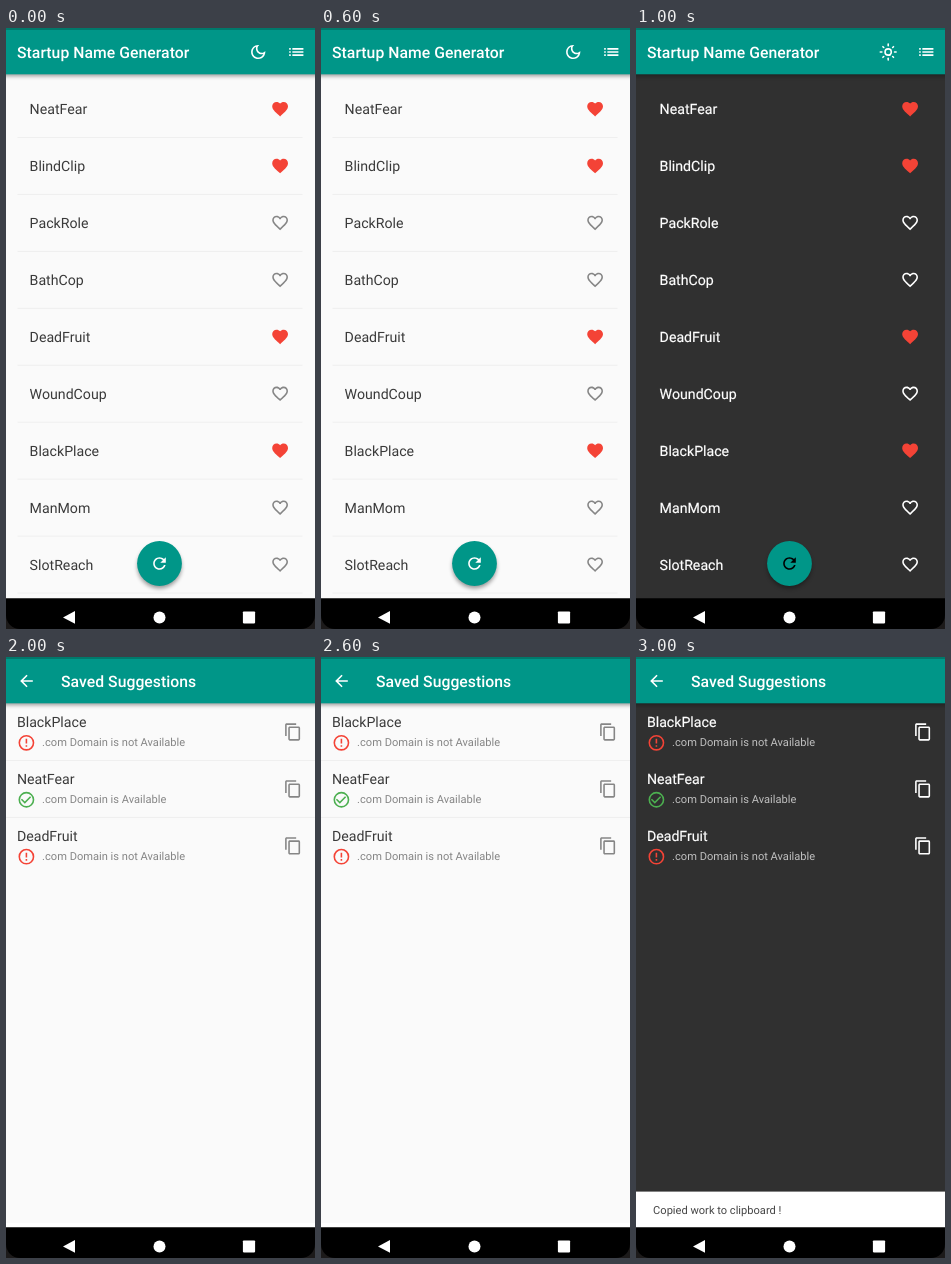
Animation, 309 px wide and 601 px high, one loop 4000 ms. Source, as an HTML page:

```html
<!DOCTYPE html>
<html lang="en">
<head>
<meta charset="utf-8">
<title>Name generator app</title>
<style>
html, body { margin: 0; width: 100%; height: 100%; overflow: hidden; background: #000; }
svg { display: block; width: 309px; height: 601px; font-family: Roboto, sans-serif; text-rendering: geometricPrecision; }
.title { font-size: 15.74px; font-weight: 500; letter-spacing: .04px; fill: #fff; }
.name { font-size: 14.17px; }
.note { font-size: 11.1px; }
.dark .name { stroke: #fff; stroke-width: .2px; }
</style>
</head>
<body>
<svg id="stage" viewBox="0 0 309 601" xmlns="http://www.w3.org/2000/svg">
  <defs>
    <filter id="soft" x="-30%" y="-50%" width="160%" height="200%"><feGaussianBlur stdDeviation="2"/></filter>
  </defs>
  <g id="view"></g>
  <rect y="580" width="309" height="21" fill="#1c1a1a"/>
  <path d="M0 570.2H309V587a14 14 0 0 1-14 14H14a14 14 0 0 1-14-14z"/>
  <g fill="#fff">
    <path d="M57 589.4L69 583v12.8z"/>
    <circle cx="153.5" cy="589.4" r="6"/>
    <rect x="236.9" y="583.5" width="12.2" height="11.9" rx=".8"/>
  </g>
</svg>
<script>
const HOLD = 1000, PITCH = 56.94, SCALE = 0.79;
const TEAL = '#009688', RED = '#f44336', GREEN = '#4caf50';

const light = { mode: 'light', bg: '#fafafa', text: '#3a3a3a', note: '#858585', icon: '#868686', fab: '#fff', line: '#efefef', shadow: .4 };
const dark = { mode: 'dark', bg: '#303030', text: '#fff', note: '#c0c0c0', icon: '#fff', fab: '#000', line: 'none', shadow: .35 };

const names = ['NeatFear', 'BlindClip', 'PackRole', 'BathCop', 'DeadFruit', 'WoundCoup', 'BlackPlace', 'ManMom', 'SlotReach'];
const liked = new Set(['NeatFear', 'BlindClip', 'DeadFruit', 'BlackPlace']);
const saved = [['BlackPlace', false], ['NeatFear', true], ['DeadFruit', false]];

const path = d => `<path d="${d}"/>`;
const ring = '<circle cx="12" cy="12" r="9" fill="none" stroke="currentColor" stroke-width="2"/>';
const rays = [0, 45, 90, 135, 180, 225, 270, 315]
  .map(a => `<path d="M12 ${a % 90 ? 2.5 : 2}V4" transform="rotate(${a} 12 12)"/>`).join('');

// Shapes on a 24 x 24 grid
const icons = {
  heart: path('M12 21.35l-1.45-1.32C5.4 15.36 2 12.28 2 8.5 2 5.42 4.42 3 7.5 3c1.74 0 3.41.81 4.5 2.09C13.09 3.81 14.76 3 16.5 3 19.58 3 22 5.42 22 8.5c0 3.78-3.4 6.86-8.55 11.54z'),
  heartLine: path('M16.5 3c-1.74 0-3.41.81-4.5 2.09C10.91 3.81 9.24 3 7.5 3 4.42 3 2 5.42 2 8.5c0 3.78 3.4 6.86 8.55 11.54L12 21.35l1.45-1.32C18.6 15.36 22 12.28 22 8.5 22 5.42 19.58 3 16.5 3zm-4.4 15.55l-.1.1-.1-.1C7.14 14.24 4 11.39 4 8.5 4 6.5 5.5 5 7.5 5c1.54 0 3.04.99 3.57 2.36h1.87C13.46 5.99 14.96 5 16.5 5c2 0 3.5 1.5 3.5 3.5 0 2.89-3.14 5.74-7.9 10.05z'),
  moon: path('M9.37 5.51C9.19 6.15 9.1 6.82 9.1 7.5c0 4.08 3.32 7.4 7.4 7.4.68 0 1.35-.09 1.99-.27C17.45 17.19 14.93 19 12 19c-3.86 0-7-3.14-7-7 0-2.93 1.81-5.45 4.37-6.49zM12 3c-4.97 0-9 4.03-9 9s4.03 9 9 9 9-4.03 9-9c0-.46-.04-.92-.1-1.36-.98 1.37-2.58 2.26-4.4 2.26-2.98 0-5.4-2.42-5.4-5.4 0-1.81.89-3.42 2.26-4.4C12.92 3.04 12.46 3 12 3z'),
  sun: `<g fill="none" stroke="currentColor" stroke-width="2" stroke-linecap="round"><circle cx="12" cy="12" r="4"/>${rays}</g>`,
  list: path('M3 7h2v2H3zM3 11h2v2H3zM3 15h2v2H3zM7 7h14v2H7zM7 11h14v2H7zM7 15h14v2H7z'),
  refresh: path('M17.65 6.35C16.2 4.9 14.21 4 12 4c-4.42 0-7.99 3.58-7.99 8s3.57 8 7.99 8c3.73 0 6.84-2.55 7.73-6h-2.08c-.82 2.33-3.04 4-5.65 4-3.31 0-6-2.69-6-6s2.69-6 6-6c1.66 0 3.14.69 4.22 1.78L13 11h7V4z'),
  back: path('M20 11H7.83l5.59-5.59L12 4l-8 8 8 8 1.41-1.41L7.83 13H20z'),
  copy: path('M16 1H4c-1.1 0-2 .9-2 2v14h2V3h12zm3 4H8c-1.1 0-2 .9-2 2v14c0 1.1.9 2 2 2h11c1.1 0 2-.9 2-2V7c0-1.1-.9-2-2-2zm0 16H8V7h11z'),
  error: ring + path('M11 15h2v2h-2zM11 7h2v6h-2z'),
  check: ring + path('M16.59 7.58L10 14.17l-3.59-3.58L5 12l5 5 8-8z')
};

const icon = (name, x, y, color) =>
  `<g transform="translate(${x} ${y}) scale(${SCALE}) translate(-12 -12)" fill="${color}" color="${color}">${icons[name]}</g>`;
const text = (s, x, y, cls, color) =>
  `<text x="${x}" y="${y}" class="${cls}"${color ? ` fill="${color}"` : ''}>${s}</text>`;
const rect = (x, y, w, h, color, extra = '') =>
  `<rect x="${x}" y="${y}" width="${w}" height="${h}" fill="${color}" ${extra}/>`;

const appBar = (theme, content) =>
  rect(-8, 6, 325, 42, '#000', `opacity="${theme.shadow}" filter="url(#soft)"`) +
  rect(0, 0, 309, 46.3, TEAL) + rect(0, 0, 309, 2, '#00796b') + content;

const page = (theme, body, bar) =>
  `<g class="${theme.mode}">${rect(0, 0, 309, 571, theme.bg)}${body}${appBar(theme, bar)}</g>`;

function homePage(theme, modeIcon) {
  const rows = names.map((name, i) => {
    const y = 81 + i * PITCH, on = liked.has(name);
    return text(name, 23.6, y + 5.2, 'name', theme.text) +
      icon(on ? 'heart' : 'heartLine', 274.1, y, on ? RED : theme.icon) +
      rect(11.5, y + 28, 285, 1, theme.line);
  }).join('');
  const fab = `<circle cx="153.5" cy="538.5" r="22" opacity="${theme.shadow}" filter="url(#soft)"/>` +
    `<circle cx="153.5" cy="535.5" r="22.4" fill="${TEAL}"/>` + icon('refresh', 153.5, 535.5, theme.fab);
  const bar = text('Startup Name Generator', 11, 30, 'title') +
    icon(modeIcon, 252.2, 24, '#fff') + icon('list', 290.3, 24, '#fff');
  return page(theme, rows + fab, bar);
}

function savedPage(theme, message) {
  const rows = saved.map(([name, free], i) => {
    const y = 75 + i * PITCH;
    return text(name, 10.9, y - 5, 'name', theme.text) +
      icon(free ? 'check' : 'error', 20.4, y + 10.8, free ? GREEN : RED) +
      text(`.com Domain is ${free ? '' : 'not '}Available`, 36.1, y + 14.4, 'note', theme.note) +
      icon('copy', 287, y, theme.icon) +
      (i < saved.length - 1 ? rect(0, y + 28, 309, 1, theme.line) : '');
  }).join('');
  const snack = message
    ? rect(0, 534.6, 309, 36.4, '#fff') + text(message, 17.1, 556.8, 'note', '#444')
    : rect(0, 566, 309, 5, '#fff');
  const bar = icon('back', 20.5, 24, '#fff') + text('Saved Suggestions', 55, 30, 'title');
  return page(theme, rows + snack, bar);
}

const scenes = [
  homePage(light, 'moon'),
  homePage(dark, 'sun'),
  savedPage(light),
  savedPage(dark, 'Copied work to clipboard !')
];

const view = document.getElementById('view');
const start = performance.now();
let shown = -1;

function draw(now) {
  const index = Math.floor(Math.max(0, now - start) / HOLD) % scenes.length;
  if (index !== shown) {
    view.innerHTML = scenes[index];
    shown = index;
  }
  requestAnimationFrame(draw);
}
draw(start);
</script>
</body>
</html>
```
